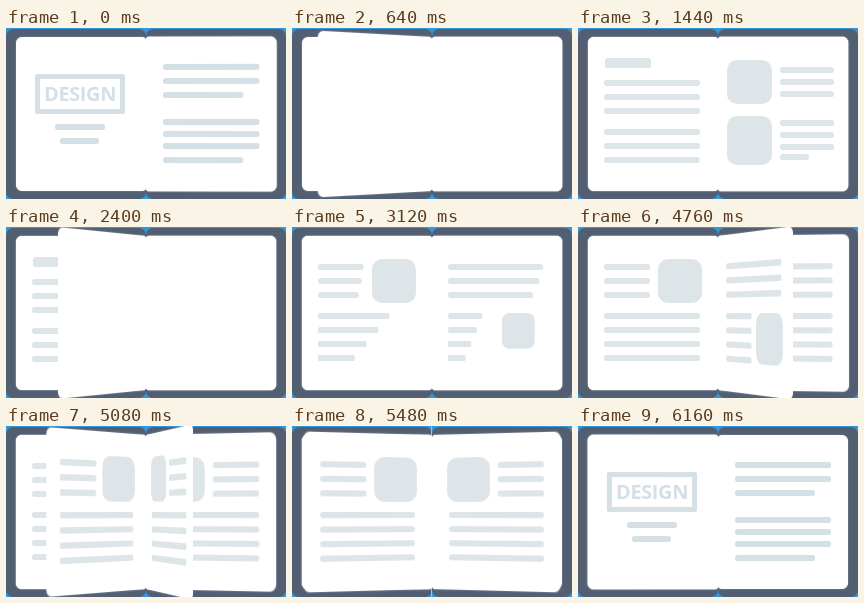
Animation, 280 px wide and 171 px high, one loop 7.24 s. Source, as an HTML page:

```html
<!DOCTYPE html>
<html>
<head>
<meta charset="utf-8">
<style>
  html, body { margin: 0; width: 100%; height: 100%; overflow: hidden; background: #3398db; }
  #book { position: relative; width: 280px; height: 171px; overflow: hidden;
    perspective: 1000px; perspective-origin: 140px 86px; }
  #book div { position: absolute; box-sizing: border-box; }
  #book .cover { top: 1px; width: 140px; height: 170px; border-radius: 7px; background: #525f73; }
  #book .page { left: 140px; top: 9px; width: 130px; height: 154px; background: #fff; border-radius: 4px 6px 6px 4px;
    box-shadow: 0 0 1.5px rgba(255, 255, 255, .5); }
  #book .leaf { transform-origin: 0 50%; }
  #book .left { left: 10px; border-radius: 6px 4px 4px 6px; }
  #book .face { width: 130px; height: 154px; }
  #book .flip { transform: scaleX(-1); }
  #book .block { background: #dde5e8; border-radius: 2.5px; transform-origin: 0 0; }
  #book .cool .block { background: #d5dfe6; }
  #book .title { left: 19px; top: 37px; width: 90px; height: 40px; border: 5px solid #d5dfe6; border-radius: 2px;
    color: #d5dfe6; font: bold 20px/30px "Open Sans", "Noto Sans", sans-serif; letter-spacing: -.4px; text-align: center; }
</style>
</head>
<body>
<div id="book"></div>
<script>
const LOOP = 7240, GROW = 450, SPREAD = 250;
const book = document.getElementById('book');

const rows = (x, w, ...ys) => ys.map(y => [x, y, w, 6]);
const mirror = blocks => blocks.map(([x, y, w, h]) => [280 - x - w, y, w, h]);

const cover = [...rows(49, 50, 96), ...rows(54, 39, 110)];
const intro = [...rows(157, 96, 36, 50, 91, 103, 115), ...rows(157, 80, 64, 129)];
const chapter = [[27, 30, 46, 10], ...rows(26, 96, 52, 66, 80, 101, 115, 129)];
const gallery = [[149, 32, 45, 44], [149, 88, 45, 49],
  ...rows(202, 54, 39, 51, 63, 92, 104, 116), ...rows(202, 29, 126)];
const article = [[80, 32, 44, 44], ...rows(26, 46, 37, 51, 65), ...rows(26, 96, 86, 100, 114, 128)];
const story = [[210, 86, 44, 48], ...rows(156, 96, 37, 51, 65), ...rows(156, 46, 86, 100, 114, 128)];
const reverse = mirror(article);

const growing = [];

function add(parent, className) {
  const el = document.createElement('div');
  el.className = className;
  parent.append(el);
  return el;
}

// growEnd: time at which the blocks have finished drawing themselves
function fill(face, blocks, originX, growEnd) {
  if (blocks === cover || blocks === intro) face.classList.add('cool');
  if (blocks === cover) add(face, 'title').textContent = 'DESIGN';
  for (const [x, y, w, h] of blocks) {
    const el = add(face, 'block');
    el.style.cssText = `left:${x - originX}px;top:${y - 9}px;width:${w}px;height:${h}px`;
    if (h > 40) el.style.borderRadius = '10px';
    if (growEnd) {
      const start = growEnd - GROW - SPREAD + Math.min(1, (y - 30) / 98) * SPREAD;
      growing.push({ el, start, image: h > 40 });
    }
  }
}

function makeLeaf([start, duration, right, left, rightGrow, leftGrow]) {
  const el = add(book, 'page leaf');
  const front = add(el, 'face'), back = add(el, 'face flip');
  fill(front, right, 140, rightGrow);
  fill(back, left, 10, leftGrow);
  return { el, front, back, start, duration };
}

add(book, 'cover');
add(book, 'cover').style.left = '140px';
fill(add(book, 'page left'), cover, 10);
fill(add(book, 'page'), intro, 140);

const leaves = [
  [-65, 1000, intro, chapter, 0, 1460],
  [1765, 1000, gallery, article, 1460, 3380],
  [4306, 1170, story, article, 3380, 0],
  [4589, 1133, reverse, article],
  [4835, 1290, reverse, article],
  [5291, 900, reverse, cover]
].map(makeLeaf);

const ease = x => (1 - Math.cos(Math.PI * Math.max(0, Math.min(1, x)))) / 2;

function draw(t) {
  leaves.forEach(({ el, front, back, start, duration }, i) => {
    const angle = 180 * ease((t - start) / duration), turned = angle > 90;
    el.style.transform = `rotateY(${-angle}deg)`;
    el.style.zIndex = turned ? 10 + i : 10 - i;
    front.style.display = turned ? 'none' : '';
    back.style.display = turned ? '' : 'none';
  });
  for (const { el, start, image } of growing) {
    const s = ease((t - start) / GROW);
    el.style.transform = `scale(${s}, ${image ? s : 1})`;
  }
}

const begin = performance.now();
function tick() {
  draw((performance.now() - begin) % LOOP);
  requestAnimationFrame(tick);
}
tick();
</script>
</body>
</html>
```
